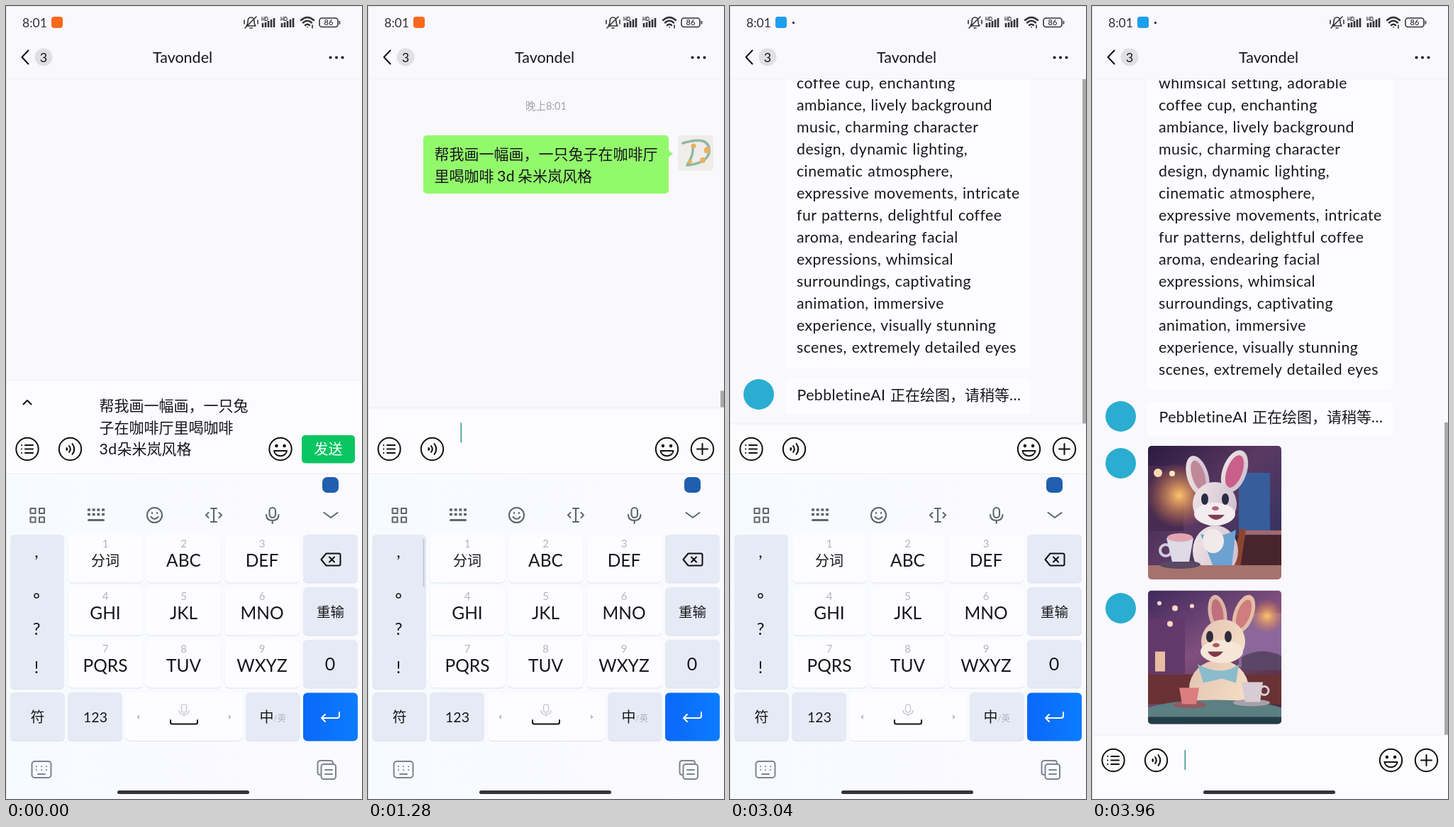
These frames come from a looping animation (502 by 1116 pixels, 4000 ms). An HTML page:

```html
<!DOCTYPE html>
<html lang="zh-CN">
<head>
<meta charset="utf-8">
<title>Chat</title>
<style>
html, body { margin: 0; width: 100%; height: 100%; overflow: hidden; background: #f9f8fd; }
svg { display: block; width: 100vw; height: 100vh; }
text { font-family: Lato, "Noto Sans CJK SC", "Noto Sans CJK", sans-serif; fill: #17171b; white-space: pre; }
.zh { font-size: 21px; font-family: "Noto Sans CJK SC", "Noto Sans CJK", sans-serif; }
.en { font-size: 21.3px; font-family: Lato, sans-serif; letter-spacing: .45px; word-spacing: 1px; }
.mid { text-anchor: middle; }
.line { fill: none; stroke: #111; stroke-width: 2; stroke-linecap: round; stroke-linejoin: round; }
.tool { stroke: #60656f; stroke-width: 2.1; }
.pale { stroke: #7d8392; }

/* 1% = 40 ms */
.scroll, .dock, .panel, .keys { animation: 4s ease-out infinite; }
.scroll { animation-name: scroll; }
.dock { animation-name: dock; }
.panel { animation-name: panel; }
.keys { animation-name: keys; }
.cut { animation: 4s step-end infinite; }
.typed { animation-name: typed; }
.sent { animation-name: sent; }
.reply { animation-name: reply; }
.tag { animation-name: tag; }
.rec { animation-name: rec; }
.caret1 { animation-name: caret1; }
.caret2 { animation-name: caret2; }
.bar1 { animation-name: bar1; }
.bar2 { animation-name: bar2; }
.bar3 { animation-name: bar3; }

@keyframes scroll {
  0%, 66% { transform: translateY(0); }
  69%, 71% { transform: translateY(-441px); }
  74%, 83% { transform: translateY(-512px); }
  87%, 91% { transform: translateY(-74px); }
  93%, 95% { transform: translateY(-277px); }
  98%, 100% { transform: translateY(-481px); }
}
@keyframes dock {
  0%, 83% { transform: translateY(0); }
  87%, 100% { transform: translateY(438px); }
}
@keyframes keys {
  0%, 83% { transform: translateY(0); }
  87%, 100% { transform: translateY(60px); }
}
@keyframes panel {
  0%, 30% { transform: translateY(-61px); animation-timing-function: linear; }
  32% { transform: translateY(-23px); }
  34%, 100% { transform: translateY(0); }
}
@keyframes typed { 0% { opacity: 1; } 30%, 100% { opacity: 0; } }
@keyframes sent { 0% { opacity: 0; } 30%, 100% { opacity: 1; } }
@keyframes reply { 0% { opacity: 0; } 58%, 100% { opacity: 1; } }
@keyframes tag { 0% { opacity: 0; } 66%, 100% { opacity: 1; } }
@keyframes rec { 0% { opacity: 0; } 62%, 100% { opacity: 1; } }
@keyframes caret1 { 0% { opacity: 0; } 12% { opacity: 1; } 25%, 100% { opacity: 0; } }
@keyframes caret2 {
  0% { opacity: 0; } 30% { opacity: 1; } 43% { opacity: 0; }
  55% { opacity: 1; } 68% { opacity: 0; } 87%, 100% { opacity: 1; }
}
@keyframes bar1 { 0% { opacity: 0; } 31% { opacity: 1; } 58%, 100% { opacity: 0; } }
@keyframes bar2 { 0% { opacity: 0; } 66% { opacity: 1; } 82%, 100% { opacity: 0; } }
@keyframes bar3 { 0% { opacity: 0; } 95%, 100% { opacity: 1; } }
</style>
</head>
<body>
<svg viewBox="0 0 502 1116">
  <defs>
    <g id="smile">
      <circle class="line" r="15.7"/>
      <circle cx="-5.6" cy="-4.5" r="2.2"/><circle cx="5.6" cy="-4.5" r="2.2"/>
      <path class="line" d="M-9 2.5H9C8 12-8 12-9 2.5Z"/>
    </g>
    <g id="signal">
      <text x="-11" y="-2" font-size="6.5" font-weight="700">HD</text>
      <path d="M-9 7V1M-5 7V0M-1 7V-2M3 7V-4M7 7V-6" stroke="#333" stroke-width="2.6"/>
    </g>
    <linearGradient id="blue"><stop stop-color="#0a68f8"/><stop offset="1" stop-color="#0b7cff"/></linearGradient>
    <linearGradient id="kb"><stop stop-color="#f6fbff"/><stop offset=".4" stop-color="#f9faff"/><stop offset="1" stop-color="#fafaff"/></linearGradient>
    <linearGradient id="night" x2="1" y2="1"><stop stop-color="#2b1b40"/><stop offset=".45" stop-color="#5b3963"/><stop offset="1" stop-color="#24305f"/></linearGradient>
    <linearGradient id="dusk" x2=".6" y2="1"><stop stop-color="#40295c"/><stop offset=".5" stop-color="#80507e"/><stop offset="1" stop-color="#4e2c44"/></linearGradient>
    <linearGradient id="fur1" x2="1" y2=".4"><stop stop-color="#f0e6e6"/><stop offset="1" stop-color="#d2c3d2"/></linearGradient>
    <linearGradient id="fur2" x2="1" y2=".4"><stop stop-color="#e3c3b4"/><stop offset="1" stop-color="#f3dcc4"/></linearGradient>
    <radialGradient id="glow"><stop stop-color="#ffc36d"/><stop offset="1" stop-color="#ee7d45" stop-opacity="0"/></radialGradient>
    <clipPath id="photo"><rect width="188" height="188" rx="5"/></clipPath>
  </defs>

  <rect width="502" height="1116" fill="#f9f8fd"/>

  <g class="scroll">
    <g class="cut sent">
      <text class="mid" x="251" y="146" font-size="14.5" style="fill:#a3a3aa">晚上8:01</text>
      <path d="M422 202l8 6l-8 6z" fill="#93f96c"/>
      <rect x="78" y="182" width="346" height="82" rx="5" fill="#93f96c"/>
      <text class="zh" x="93.500" y="215.500">帮我画一幅画，一只兔子在咖啡厅</text>
      <text class="zh" y="246.500"><tspan x="93.500">里喝咖啡</tspan><tspan class="en" x="182">3d</tspan><tspan x="211">朵米岚风格</tspan></text>
      <rect x="437" y="182" width="50" height="50" rx="5" fill="#efedea"/>
      <path d="M444 193Q484 181 481 207Q476 222 450 224M458 199Q459 210 451 222" fill="none" stroke="#8fb8a0" stroke-width="3.500" stroke-linecap="round"/>
      <g fill="#e8b065"><circle cx="459" cy="197" r="3.500"/><circle cx="478" cy="203" r="4.500"/><circle cx="472" cy="217" r="4"/><circle cx="454" cy="219" r="3"/></g>
    </g>
    <g class="cut reply">
      <circle cx="40.500" cy="304.500" r="21.500" fill="#2aadd0"/>
      <path d="M80 299l-8 6l8 6z" fill="#fdfdff"/>
      <rect x="78" y="283" width="346" height="113" rx="5" fill="#fdfdff"/>
      <text class="zh" x="94" y="313.500">您似乎希望画一幅图，正使用默认</text>
      <text class="zh" x="94" y="344.500">配置绘画中，请稍后，高级配置发</text>
      <text class="zh" y="375.500"><tspan x="94">送</tspan><tspan class="en" x="116">-h</tspan><tspan x="141">查看帮助</tspan></text>
    </g>
    <g class="cut tag">
      <circle cx="40.500" cy="433.500" r="21.500" fill="#2aadd0"/>
      <rect x="78" y="412" width="346" height="609" rx="5" fill="#fdfdff"/>
      <g id="story"></g>
      <circle cx="40.500" cy="1058.500" r="21.500" fill="#2aadd0"/>
      <rect x="78" y="1037" width="346" height="50" rx="5" fill="#fdfdff"/>
      <text class="zh" y="1067"><tspan class="en" x="94.500">PebbletineAI</tspan><tspan x="226">正在绘图，请稍等</tspan><tspan class="en" x="394">...</tspan></text>

      <circle cx="40.500" cy="1124.500" r="21.500" fill="#2aadd0"/>
      <g transform="translate(79 1100)" clip-path="url(#photo)">
        <rect width="188" height="188" fill="url(#night)"/>
        <path d="M128 38H172V120H128Z" fill="#375d9c"/>
        <path d="M0 28H50V120H0Z" fill="#472b50"/>
        <circle cx="44" cy="70" r="46" fill="url(#glow)"/>
        <circle cx="14" cy="38" r="6" fill="#ffd9ae"/><circle cx="34" cy="39" r="4" fill="#ffe3c0"/>
        <path d="M120 126H188V168H120Z" fill="#48242f"/>
        <path d="M132 122H188" stroke="#a5686a" stroke-width="6"/>
        <path d="M118 170L130 116L138 118L130 172Z" fill="#8b452f"/>
        <ellipse cx="95" cy="148" rx="32" ry="36" fill="url(#fur1)"/>
        <path d="M74 124L92 170H118L124 118Q100 132 74 124Z" fill="#6ba2d0"/>
        <ellipse cx="92" cy="134" rx="15" ry="17" fill="#f2e9ea"/>
        <g transform="translate(70 42) rotate(-17)"><ellipse rx="15" ry="29" fill="url(#fur1)"/><ellipse cx="1" rx="9" ry="22" fill="#c0899a"/></g>
        <g transform="translate(122 36) rotate(20)"><ellipse rx="17" ry="31" fill="url(#fur1)"/><ellipse rx="11" ry="24" fill="#c9608c"/></g>
        <ellipse cx="94" cy="82" rx="31" ry="31" fill="url(#fur1)"/>
        <ellipse cx="94" cy="96" rx="29" ry="16" fill="#f4ecee"/>
        <ellipse cx="80" cy="75" rx="5" ry="8" fill="#292b45"/><ellipse cx="109" cy="75" rx="5" ry="8" fill="#292b45"/>
        <ellipse cx="95" cy="88" rx="5" ry="3" fill="#b46278"/><path d="M84 97H108Q96 111 84 97Z" fill="#823e54"/>
        <rect y="168" width="188" height="20" fill="#a5726d"/>
        <ellipse cx="45" cy="167" rx="29" ry="6" fill="#584964"/>
        <circle cx="25" cy="147" r="8" fill="none" stroke="#cfcbdc" stroke-width="4"/>
        <path d="M26 130H64L58 163H34Z" fill="#dedae6"/><ellipse cx="45" cy="129" rx="18" ry="6" fill="#e2a3b3"/>
      </g>

      <circle cx="40.500" cy="1328.500" r="21.500" fill="#2aadd0"/>
      <g transform="translate(79 1303.500)" clip-path="url(#photo)">
        <rect width="188" height="188" fill="url(#dusk)"/>
        <path d="M128 32H188V108H128Z" fill="#8b6899"/>
        <path d="M0 40H52V118H0Z" fill="#62396a"/>
        <path d="M0 118H188V160H0Z" fill="#693235"/>
        <circle cx="168" cy="36" r="24" fill="url(#glow)"/>
        <g fill="#ffd5c4"><circle cx="16" cy="18" r="3"/><circle cx="38" cy="25" r="4"/><circle cx="62" cy="22" r="3"/><circle cx="31" cy="47" r="4"/></g>
        <path d="M10 86H24V114H10Z" fill="#e8bda2"/>
        <path d="M132 94Q160 78 188 92V112H132Z" fill="#5b4668"/>
        <ellipse cx="100" cy="138" rx="42" ry="40" fill="url(#fur2)"/>
        <g transform="translate(98 32) rotate(-10)"><ellipse rx="13" ry="26" fill="#dbb5a6"/><ellipse rx="8" ry="20" fill="#c0707c"/></g>
        <g transform="translate(135 33) rotate(20)"><ellipse rx="14" ry="28" fill="#e4bda8"/><ellipse rx="9" ry="21" fill="#cf7d7f"/></g>
        <path d="M70 104Q104 122 128 104L124 130L104 124L78 130Z" fill="#8abccb"/>
        <ellipse cx="106" cy="72" rx="31" ry="31" fill="url(#fur2)"/>
        <ellipse cx="104" cy="86" rx="30" ry="16" fill="#f6e6d8"/>
        <ellipse cx="87" cy="65" rx="5" ry="8" fill="#302a3d"/><ellipse cx="113" cy="65" rx="5" ry="8" fill="#302a3d"/>
        <ellipse cx="96" cy="77" rx="5" ry="3" fill="#a85a64"/><path d="M84 86H106Q94 101 84 86Z" fill="#7d3948"/>
        <ellipse cx="94" cy="178" rx="112" ry="24" fill="#5b7f82"/>
        <path d="M0 178H188V188H0Z" fill="#243c48"/>
        <ellipse cx="59" cy="161" rx="23" ry="5" fill="#93595f"/><path d="M44 137H72L68 160H48Z" fill="#dc7d80"/>
        <ellipse cx="146" cy="158" rx="26" ry="5" fill="#a8a0aa"/><path d="M132 129H162L158 157H137Z" fill="#d7ccd4"/>
        <circle cx="164" cy="141" r="6" fill="none" stroke="#d7ccd4" stroke-width="3"/>
      </g>
    </g>
  </g>

  <g class="dock">
    <rect class="cut bar2" x="497" y="102" width="5" height="486" fill="#a9a9ab"/>
    <rect class="cut bar3" x="497" y="148" width="5" height="440" fill="#a9a9ab"/>
    <g class="panel">
      <rect class="cut bar1" x="497" y="564" width="5" height="24" fill="#a9a9ab"/>
      <rect y="588" width="502" height="700" fill="#fcfcff"/>
      <path d="M0 588H502" stroke="#ececf1"/>
      <rect class="cut caret2" x="130.500" y="609" width="1.700" height="28" fill="#3f9c88"/>
    </g>

    <g class="line" transform="translate(30 623.500)">
      <circle r="15.700"/><path d="M-3-5.500H8M-3 0H8M-3 5.500H8M-8-5.500h.1M-8 0h.1M-8 5.500h.1"/>
    </g>
    <g class="line" transform="translate(90.500 623.500)">
      <circle r="15.700"/><path d="M-5-1.500Q-3.500 0-5 1.500ZM-1.500-4.500Q2 0-1.500 4.500M3-7.500Q8.500 0 3 7.500"/>
    </g>

    <g class="cut typed">
      <path class="line" d="M24.500 560.500L30 555L35.500 560.500"/>
      <text class="zh" x="131.500" y="570">帮我画一幅画，一只兔</text>
      <text class="zh" x="131.500" y="600.500">子在咖啡厅里喝咖啡</text>
      <text class="zh" y="631"><tspan class="en" x="131.500">3d</tspan><tspan x="156.500">朵米岚风格</tspan></text>
      <rect class="cut caret1" x="262" y="609" width="2" height="29" fill="#22b893"/>
      <use href="#smile" x="387" y="623.500"/>
      <rect x="417" y="604" width="75" height="39.500" rx="5" fill="#09c562"/>
      <text class="mid" x="454.500" y="631" font-size="20" style="fill:#fff">发送</text>
    </g>
    <g class="cut sent">
      <use href="#smile" x="421.500" y="623.500"/>
      <g class="line" transform="translate(471.500 623.500)"><circle r="15.700"/><path d="M-7.500 0H7.500M0-7.500V7.500"/></g>
    </g>

    <g class="keys">
      <rect y="658" width="502" height="470" fill="url(#kb)"/>
      <path d="M0 658.500H502" stroke="#ebedf3"/>
      <rect x="446" y="663" width="23" height="22" rx="7" fill="#1f5fae"/>

      <g class="line tool">
        <path d="M34.500 707h7v7h-7zM47 707h7v7h-7zM34.500 719.500h7v7h-7zM47 719.500h7v7h-7z"/>
        <path d="M115 709h24M115 715.500h24" stroke-dasharray="4 2.670" stroke-linecap="butt" style="stroke-width:3.500"/>
        <path d="M116.500 723.500h21" style="stroke-width:3"/>
        <circle cx="209.500" cy="716.500" r="10.500"/>
        <path d="M206 713v1M213 713v1M204.500 719Q209.500 725 214.500 719"/>
        <path d="M289 707h8M293 707v19M289 726h8M285.500 713l-3.500 3.500l3.500 3.500M300.500 713l3.500 3.500l-3.500 3.500"/>
        <rect x="371.500" y="706" width="8.500" height="14" rx="4.200"/>
        <path d="M367 716Q367 724 375.700 724T384.500 716M375.700 724v4"/>
        <path d="M448.500 713l9.500 7l9.500-7"/>
      </g>

      <g id="pad"></g>
      <rect class="cut bar1" x="77.500" y="750" width="2" height="67" fill="#c3c7d0"/>

      <g class="line">
        <path d="M444.500 779l7-8.500h18q2 0 2 2v13q0 2-2 2h-18zM456 775.500l7 7M463 775.500l-7 7"/>
        <path d="M232 1005v3q0 2.500 2.500 2.500h33q2.500 0 2.500-2.500v-3"/>
        <path d="M470 994v5q0 3-3 3H445M450 997l-5 5l5 5" style="stroke:#fff"/>
      </g>
      <g fill="none" stroke="#c9c9d0" stroke-width="1.500">
        <rect x="247.500" y="983" width="7" height="11" rx="3.500"/><path d="M244 991Q244 997 251 997T258 991M251 997v3"/>
      </g>
      <path d="M188 997v7l-4-3.500zM314 997v7l4-3.500z" fill="#c0c0c8"/>

      <g class="line pale">
        <rect x="36.500" y="1063" width="27" height="23" rx="4"/>
        <path d="M43 1070h.1M50 1070h.1M57 1070h.1M43 1075h.1M50 1075h.1M57 1075h.1M45 1081h10"/>
        <path d="M443 1082q-3.500 0-3.500-3.500V1066q0-4 4-4h14q3.500 0 3.500 3.500"/>
        <rect x="444.500" y="1067" width="20.500" height="21" rx="3.500"/><path d="M450 1075h10M450 1081h10"/>
      </g>
    </g>
  </g>

  <rect width="502" height="102" fill="#f9f8fd"/>
  <path d="M0 102.500H502" stroke="#f2f1f6"/>
  <text x="23" y="29.500" font-size="17.500" style="fill:#303036">8:01</text>
  <rect x="64" y="15" width="16" height="16" rx="4" fill="#f8691d"/>
  <g class="cut rec">
    <rect x="64" y="15" width="16" height="16" rx="4" fill="#1d9ff0"/>
    <circle cx="89.500" cy="23.500" r="1.500"/>
  </g>
  <g class="line" style="stroke:#333;stroke-width:1.600">
    <path d="M339 28q2-2 2-6q0-6 4.500-6t4.500 6q0 4 2 6zM344 31h3M337 31L353 15M336 20v5M355 20v5"/>
    <path d="M416 20Q425 12 434 20M419 23.500Q425 18 431 23.500M422 27Q425 24.500 428 27" style="stroke-width:2.500"/>
    <path d="M425 29.500v.5M432 27v4"/>
    <rect x="442" y="17" width="26" height="12.500" rx="3.500"/><path d="M470.500 21.500v3.500"/>
  </g>
  <use href="#signal" x="371" y="23"/><use href="#signal" x="398" y="23"/>
  <text class="mid" x="455" y="27.300" font-size="11">86</text>

  <path class="line" d="M31.500 62.500L22.500 72L31.500 81.500"/>
  <circle cx="53" cy="72" r="12.500" fill="#dfdfe4"/>
  <text class="mid" x="53" y="78.500" font-size="18">3</text>
  <text class="mid" x="249" y="80" font-size="21.500">Tavondel</text>
  <g fill="#111"><circle cx="457.500" cy="72.500" r="2"/><circle cx="466" cy="72.500" r="2"/><circle cx="474.500" cy="72.500" r="2"/></g>
  <rect x="157" y="1104" width="186" height="5" rx="2.500" fill="#333338"/>
  <path d="M.5 1116V.5H502" fill="none" stroke="#e4e4e8"/>
</svg>

<script>
const $ = id => document.getElementById(id);

const story = `A rabbit sips coffee in a
cafe, Domilastyle 3D animation,
3D rendering, vibrant colors,
cute furry features, realistic fur
texture, animated expressions,
whimsical setting, adorable
coffee cup, enchanting
ambiance, lively background
music, charming character
design, dynamic lighting,
cinematic atmosphere,
expressive movements, intricate
fur patterns, delightful coffee
aroma, endearing facial
expressions, whimsical
surroundings, captivating
animation, immersive
experience, visually stunning
scenes, extremely detailed eyes`.split("\n");

const top0 = 441.3, pitch = 31.05;
$("story").innerHTML = `<text class="en" x="94" y="${top0}">tag：</text>` + story.map((s, i) =>
  `<text class="en" x="${i ? 94 : 154}" y="${top0 + i * pitch}">${s}</text>`).join("");

const label = (s, x, y, size, fill = "#17171b") =>
  `<text class="mid" x="${x}" y="${y}" font-size="${size}" style="fill:${fill}">${s}</text>`;
const face = (x, y, w, h, fill) =>
  `<rect x="${x}" y="${y}" width="${w}" height="${h}" rx="6" fill="${fill}"/>`;
const key = (x, y, w, h, fill) => face(x, y + 1, w, h, "#dde0e9") + face(x, y, w, h, fill);
const white = "#fdfdff", grey = "#e5eaf5";

let pad = key(6, 744, 76, 217, grey);
["分词", "ABC", "DEF", "GHI", "JKL", "MNO", "PQRS", "TUV", "WXYZ"].forEach((s, i) => {
  const x = 87.5 + i % 3 * 110.5, y = 744 + Math.floor(i / 3) * 74;
  pad += key(x, y, 105.5, 67.5, white) + label(i + 1, x + 52.5, y + 17.5, 15, "#b4b5bd")
    + label(s, x + 52.5, y + (i ? 45 : 44), i ? 24.5 : 20);
});
for (let i = 0; i < 3; i++) pad += key(419, 744 + i * 74, 77, 67.5, grey);
pad += key(6, 966, 77, 68, grey) + key(87, 966, 77, 68, grey) + key(169, 966, 164, 68, white)
  + key(338, 966, 76.5, 68, grey) + face(419, 966.5, 77, 68, "url(#blue)");
pad += label(",", 43, 776, 24) + label("?", 43, 885, 24) + label("!", 43, 939, 24)
  + `<circle cx="43" cy="830" r="3" fill="none" stroke="#222" stroke-width="1.6"/>`
  + label("重输", 457.5, 860, 19.5) + label("0", 457, 934.5, 25)
  + label("符", 44.5, 1007.5, 20) + label("123", 126, 1007.5, 19.5)
  + label("中", 367.5, 1007.5, 20) + label("/英", 386, 1007, 12, "#aeb1bb");
$("pad").innerHTML = pad;
</script>
</body>
</html>
```
